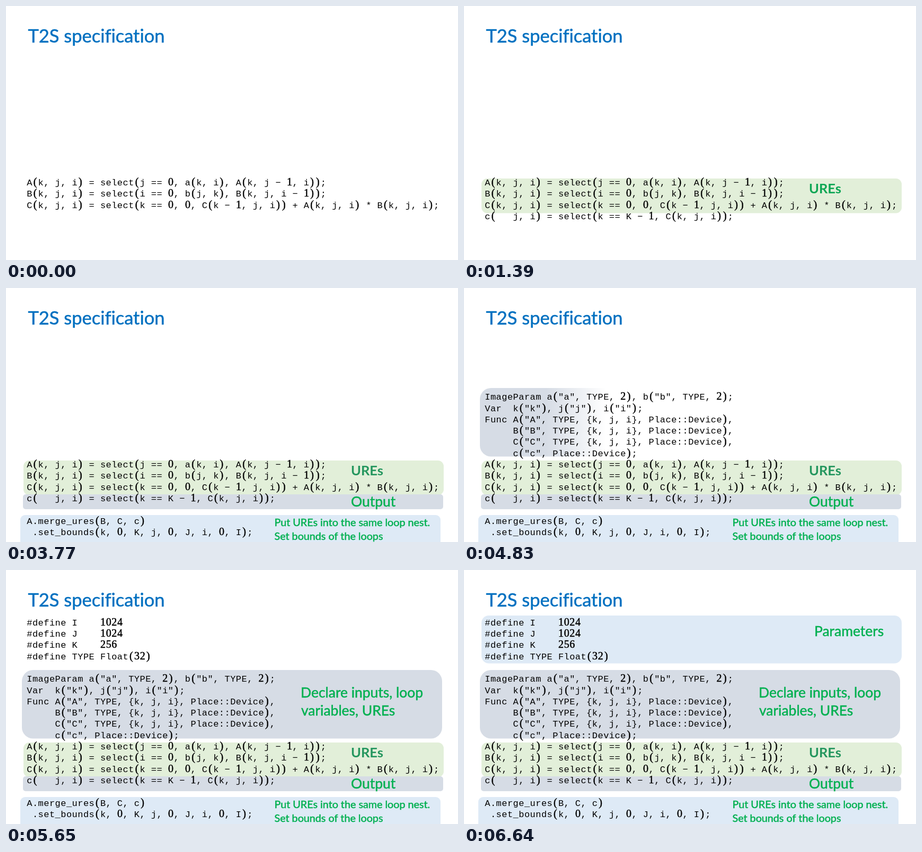
An HTML page with a canvas for the animation above (7.34 s loop, 853x480 px).

```html
<!DOCTYPE html>
<html lang="en">
<head>
<meta charset="utf-8">
<title>T2S specification</title>
<style>
  html, body { margin: 0; width: 100%; height: 100%; overflow: hidden; background: #fff; }
  canvas { display: block; }
</style>
</head>
<body>
<canvas id="stage" width="853" height="480"></canvas>
<script>
const ctx = document.getElementById('stage').getContext('2d');
const LOOP = 7340, STEP = 60, WIPE_STEPS = 8;
const CELL = 10.665, LINE = 21.3, CODE_X = 39, CODE_Y = 104.7;
const GREEN = '#00b050', BLUE_BOX = '#deeaf6', GREY_BOX = '#d6dce5';

// Each block of code: time it appears, first row, lines
const code = [
  [5650, 0, [
    '#define I    1024',
    '#define J    1024',
    '#define K    256',
    '#define TYPE Float(32)']],
  [4270, 5, [
    'ImageParam a("a", TYPE, 2), b("b", TYPE, 2);',
    'Var  k("k"), j("j"), i("i");',
    'Func A("A", TYPE, {k, j, i}, Place::Device),',
    '     B("B", TYPE, {k, j, i}, Place::Device),',
    '     C("C", TYPE, {k, j, i}, Place::Device),',
    '     c("c", Place::Device);']],
  [0, 11, [
    'A(k, j, i) = select(j == 0, a(k, i), A(k, j − 1, i));',
    'B(k, j, i) = select(i == 0, b(j, k), B(k, j, i − 1));',
    'C(k, j, i) = select(k == 0, 0, C(k − 1, j, i)) + A(k, j, i) * B(k, j, i);']],
  [1390, 14, ['c(   j, i) = select(k == K − 1, C(k, j, i));']],
  [3270, 16, [
    'A.merge_ures(B, C, c)',
    ' .set_bounds(k, 0, K, j, 0, J, i, 0, I);']]
];

// Labels are [text, x, baseline]
const boxes = [
  { start: 370, x: 33, y: 326, h: 65.5, r: 11, fill: '#e2efd9', size: 25.5, weight: 'bold',
    labels: [['UREs', 651, 354]] },
  { start: 2390, x: 32, y: 390, h: 28, r: 5, fill: GREY_BOX, size: 26.5,
    labels: [['Output', 651, 413]] },
  { start: 3770, cut: true, x: 27, y: 429, h: 64, r: 9, fill: BLUE_BOX, size: 19.8,
    labels: [['Put UREs into the same loop nest.', 506.5, 450],
             ['Set bounds of the loops', 506.5, 476]] },
  { start: 4770, x: 30, y: 189, h: 129.5, r: 21, fill: GREY_BOX, size: 26.5,
    labels: [['Declare inputs, loop', 556, 241], ['variables, UREs', 557, 275]] },
  { start: 6220, x: 33, y: 86, h: 90.5, r: 14, fill: BLUE_BOX, size: 26.5,
    labels: [['Parameters', 661, 125]] }
];
const BOX_W = 793;

// A thin outline gives regular text a slightly heavier weight
function heavyText(text, x, y) {
  ctx.lineWidth = 0.5;
  ctx.strokeStyle = ctx.fillStyle;
  ctx.fillText(text, x, y);
  ctx.strokeText(text, x, y);
}

function label(text, x, y, size, color, weight = 'normal') {
  ctx.font = `${weight} ${size}px Lato, Carlito, sans-serif`;
  ctx.letterSpacing = '-0.03px'; // any spacing turns ligatures off
  ctx.textAlign = 'left';
  ctx.fillStyle = color;
  if (weight === 'bold') ctx.fillText(text, x, y);
  else heavyText(text, x, y);
}

// Soft-edged wipe from the left, advancing once per STEP
function wipeFill(box, step) {
  const front = box.x + BOX_W * 0.15 * (step + 1);
  const gradient = ctx.createLinearGradient(front - BOX_W / 7, 0, front, 0);
  gradient.addColorStop(0, box.fill);
  gradient.addColorStop(1, box.fill + '00');
  return gradient;
}

function drawBox(box, t) {
  if (t < box.start) return;
  const step = Math.floor((t - box.start) / STEP);
  const done = box.cut || step >= WIPE_STEPS - 1;
  ctx.fillStyle = done ? box.fill : wipeFill(box, step);
  ctx.beginPath();
  ctx.roundRect(box.x, box.y, BOX_W, box.h, box.r);
  ctx.fill();
  if (!done) return;
  let color = GREEN;
  if (box.weight) color = t < 2390 ? '#0ca654' : '#24965e';
  for (const [text, x, y] of box.labels) label(text, x, y, box.size, color, box.weight);
}

// Code sits on a fixed grid; digits and parentheses are serif
function drawCode(text, row) {
  ctx.fillStyle = '#000';
  ctx.textAlign = 'center';
  ctx.letterSpacing = '0px';
  const y = CODE_Y + row * LINE;
  [...text].forEach((char, col) => {
    const x = CODE_X + (col + 0.5) * CELL;
    if (/[0-9()]/.test(char)) {
      ctx.font = '20px "Liberation Serif", serif';
      heavyText(char, x, y);
    } else {
      ctx.font = '17px "Liberation Mono", monospace';
      ctx.fillText(char, x, y);
    }
  });
}

function draw(t) {
  ctx.fillStyle = '#fff';
  ctx.fillRect(0, 0, 853, 480);
  label('T2S specification', 41.5, 68.5, 34.5, '#0070c0');
  for (const box of boxes) drawBox(box, t);
  for (const [start, row, lines] of code) {
    if (t >= start) lines.forEach((line, i) => drawCode(line, row + i));
  }
}

const began = performance.now();
function tick() {
  draw((performance.now() - began) % LOOP);
  requestAnimationFrame(tick);
}
tick();
</script>
</body>
</html>
```
